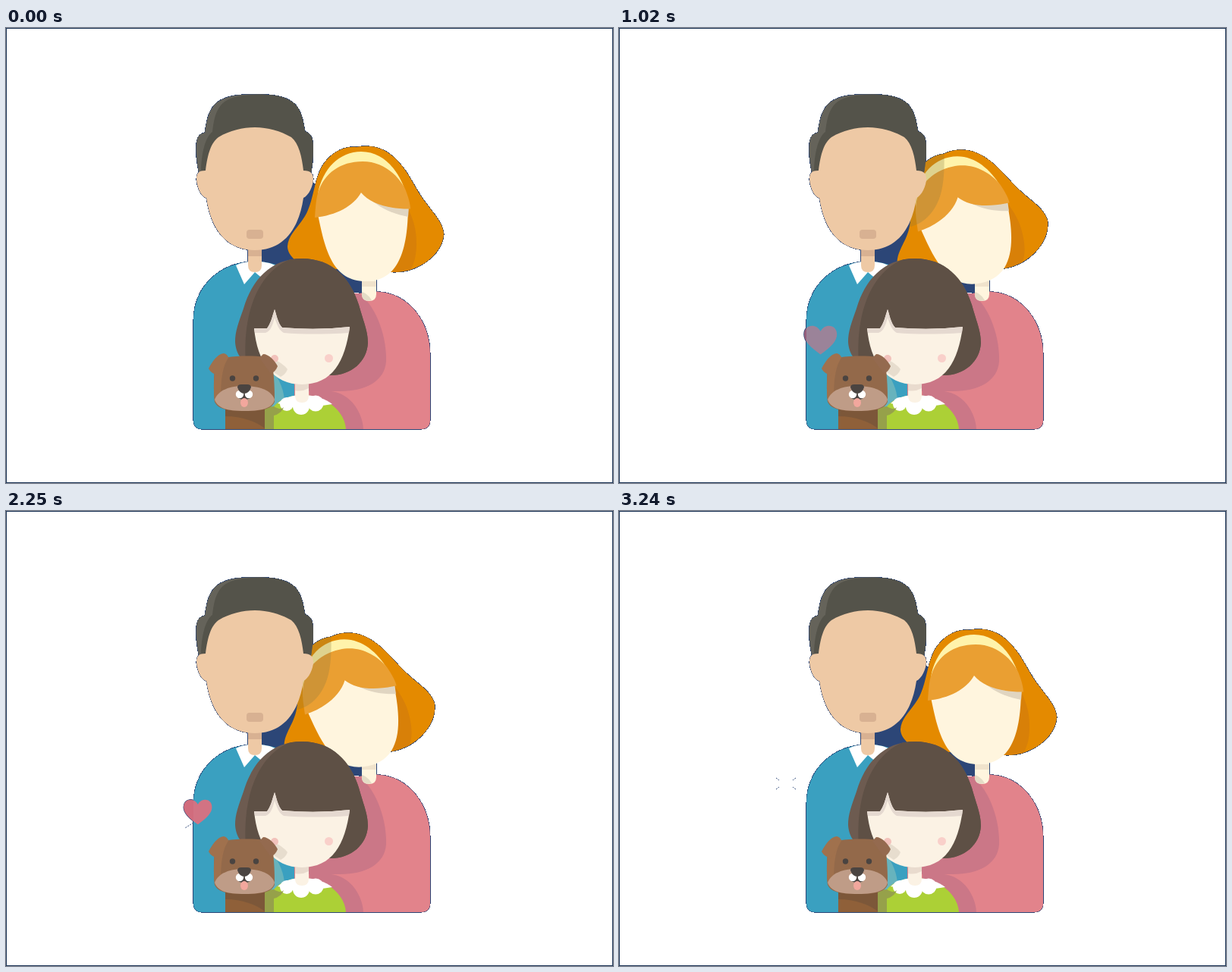
An HTML page for the animation above (3270 ms loop, 800 by 600 pixels).

```html
<!DOCTYPE html>
<html lang="en">
<head>
<meta charset="utf-8">
<title>Family</title>
<style>
html, body { margin: 0; width: 100%; height: 100%; overflow: hidden; background: #fff; }
svg { display: block; width: 800px; height: 600px; }
</style>
</head>
<body>
<svg viewBox="0 0 800 600">
<defs>
  <path id="dadHair" d="M254 190C251 175 250 160 251 152C252 142 256 139 262 138C264 125 266 108 278 98C292 88 310 87.500 328 87.500C346 87.500 365 88 378 98C390 107 392 125 394 136C400 139 404 142 404.500 152C405.500 165 404 180 402 191L392 188Z"/>
  <path id="dadFace" d="M263 188C253 188 251 192 251 200C252 212 258 223 264 224C270 265 290 293 328 293C366 293 386 265 392 224C399 221 405 208 405 199C405 192 402 188 392 188C390 170 386 152 376 144C362 136 345 131 328 131C312 131 295 135 280 144C270 152 266 165 263 188Z"/>
  <path id="dadBody" d="M259 529Q247 529 247 517V386C247 341 282 308 328 308C345 308 365 312 380 325V529Z"/>
  <path id="momBody" d="M380 529V370L466 350C476 348 485 347 493 348C530 351 559 386 559 430V517Q559 529 547 529Z"/>
  <path id="momHair" d="M462 157C443 155 425 167 415 185C406 204 405 224 398 240C390 260 372 270 371 288C371 300 385 312 400 316L512 322C544 322 575 299 577 272C576 256 562 243 553 230C538 211 532 190 512 171C498 158 482 153 462 157Z"/>
  <path id="heart" d="M0 19C-14 9-22 1-22-8C-22-22-5-23 0-12C5-23 22-22 22-8C22 1 14 9 0 19Z"/>
  <clipPath id="onHair"><use href="#momHair" class="tilt"/></clipPath>
  <clipPath id="inDadHair"><use href="#dadHair"/></clipPath>
  <clipPath id="inGirlHair"><use href="#girlHair"/></clipPath>
</defs>

<rect x=".5" y=".5" width="799" height="599" fill="#fff" stroke="#1c3557"/>

<!-- dark rim around the group -->
<g fill="#2c4677" stroke="#2c4677" stroke-width="1.2" shape-rendering="crispEdges">
  <use href="#dadHair"/><use href="#dadFace"/><use href="#dadBody"/><use href="#momBody"/>
  <use href="#momHair" class="tilt"/>
  <path d="M330 285L402 200L440 240L489 325V349H440L340 315Z" stroke="none"/>
  <path d="M319 285V310M488 325V349" fill="none"/>
</g>
<use id="heartBack" href="#heart" fill="#2c4677" stroke="#2c4677" stroke-width="1.5"/>
<g fill="none" stroke="#2c4677" stroke-dasharray="2 1.5">
  <path id="wideRays" d="M236 390L247 397M247 411L236 418"/>
  <path id="smallRays" d="M207 352L211 355M233 352L229 355M207 367L211 364M233 367L229 364"/>
</g>

<!-- mother -->
<use href="#momBody" fill="#e2838b"/>
<g fill="#cb7787">
  <path d="M440 349L466 350C490 370 502 410 501 440C499 465 475 479 440 479H390Z"/>
  <path d="M400 479H428C455 482 470 508 471 529H400Z"/>
</g>
<g class="tilt">
  <use href="#momHair" fill="#e48a00"/>
  <path d="M531 240C539 258 541 270 541 285C541 302 537 314 532 319.500L510 322L500 290Z" fill="#d88008"/>
</g>
<path d="M469 320H488V351Q488 360 478.500 360Q469 360 469 351Z" fill="#fff5de"/>
<path d="M469 334H488V341H469Z" fill="#f0e3cc"/>
<path d="M469 348C475 350 479 354 482 359Q469 362 469 351Z" fill="#e4dcc6"/>
<g class="tilt">
  <path d="M411 246C420 289 429 334 474 334C519 334 529 290 530 238L468 210Z" fill="#fff5de"/>
  <path d="M480 226L531 236L530 249C515 246 500 242 480 226Z" fill="#e0d5c1"/>
  <path d="M411 219C417 185 440 163 468 163C498 163 517 188 526 214L470 190Z" fill="#fff3ab"/>
  <path d="M407 250C408 235 409 222 412 215C420 192 440 176 470 176C496 176 515 192 526 212C530 222 533 232 533 238.500C505 239 480 232 468 217C458 235 435 247 407 250Z" fill="#ea9f32"/>
</g>
<path id="dadShade" clip-path="url(#onHair)" d="M380 150H428C430 195 428 222 413 242C405 253 395 260 380 263Z" fill="#857840"/>

<!-- father -->
<use href="#dadBody" fill="#3aa0c0"/>
<path d="M303 313C310 309 318 308 328 308C341 308 349 310 355 313L339 331L328 322L314 338Z" fill="#fff"/>
<path d="M319 285H337V313Q337 322 328 322Q319 322 319 313Z" fill="#eec9a5"/>
<path d="M319 288H337V301H319Z" fill="#d8b192"/>
<use href="#dadHair" fill="#65635a"/>
<path clip-path="url(#inDadHair)" d="M257 192C257 165 263 143 272 137C275 112 279 93 312 89L420 80V195Z" fill="#54534a"/>
<use href="#dadFace" fill="#eec9a5"/>
<rect x="317" y="266" width="22" height="12" rx="4" fill="#d8b192"/>

<use id="heartFront" href="#heart" fill="#e0707e"/>

<!-- girl -->
<path d="M341 455H354C364 470 368 485 367 500L353 510H341Z" fill="#67b3bd"/>
<path id="girlHair" d="M390 304C430 304 454 330 465 365C472 390 477 400 477 415C476 440 455 458 428 458L330 447C311 442 303 430 302 414C302 400 306 390 313 370C324 333 348 304 390 304Z" fill="#6d5b50"/>
<path clip-path="url(#inGirlHair)" d="M318 460C311 415 314 330 376 304H490V470Z" fill="#5e5045"/>
<path d="M327 396C331 440 352 470 390 470C430 470 447 440 453 394Q410 399 364 395C358 389 356 376 354 371C351 380 349 390 344 396Z" fill="#fbf2e4"/>
<path d="M327 396H344C349 390 351 380 354 371C356 376 358 389 364 395Q410 399 453 394L452 402C420 404 390 404 366 402C359 398 357 390 354 382C351 394 348 400 342 402H328Z" fill="#e5d9d0"/>
<path d="M355 438C362 441 368 446 371 450C369 455 366 458 362 460L350 452Z" fill="#e7ddce"/>
<circle cx="354" cy="436" r="5" fill="#f2c2bb"/>
<circle cx="425.500" cy="435.500" r="5.500" fill="#f9d0ca"/>
<path d="M353 529V499C362 488 378 484 392 484C425 485 447 508 448 529Z" fill="#acd036"/>
<g fill="#fff">
  <path d="M358 495C367 487 378 484 392 484C408 484 421 489 430 496L390 502Z"/>
  <circle cx="370" cy="496" r="9"/><circle cx="389" cy="499" r="11"/>
  <circle cx="408" cy="495" r="10.500"/>
</g>
<path d="M341 500L353 499C360 503 363 503 366 500C364 506 358 510 353 511V529H341Z" fill="#96a14a"/>
<path d="M381 468H399V485Q399 494 390 494Q381 494 381 485Z" fill="#fbf2e4"/>
<path d="M381 469Q390 471 399 469V475Q390 480 381 478Z" fill="#e9dbce"/>

<!-- dog -->
<path d="M289 498H341V529H289Z" fill="#7c5739"/>
<path d="M289 512C311 512 330 519 341 528V529H289Z" fill="#8f6039"/>
<g id="dogHead">
  <path d="M276 440C279 431 345 430 350 437C354 460 354 480 354 493C350 502 340 505 315 505C290 505 279 502 275 493C273 475 274 455 276 440Z" fill="#93694a"/>
  <path d="M275 493C273 475 274 455 277 441L293 434C284 450 282 470 284 500Z" fill="#a0714d"/>
  <path d="M267 449C272 440 278 430 287 429C291 430 293 433 293 435L279 459C275 456 270 455 267 449Z" fill="#a0714d"/>
  <path d="M358 446C354 438 346 430 339 430L334 435L349 456C353 454 356 451 358 446Z" fill="#946a4f"/>
  <path d="M275 490C280 477 296 472 313 472C335 472 350 478 354 490C352 500 340 505 315 505C290 505 279 501 275 490Z" fill="#bf9c87"/>
  <ellipse cx="314" cy="486" rx="9" ry="4" fill="#4a4441"/>
  <ellipse cx="314" cy="494" rx="5" ry="6" fill="#f2a79d"/>
  <circle cx="308" cy="483" r="5.200" fill="#fff"/><circle cx="320" cy="483" r="5.200" fill="#fff"/>
  <path d="M305 474Q305 470 310 470H318Q323 470 323 474Q320 482 314 482Q308 482 305 474Z" fill="#4a4441"/>
  <circle cx="298.500" cy="462" r="3.700" fill="#4a4441"/><circle cx="329.500" cy="462" r="3.700" fill="#4a4441"/>
</g>
</svg>
<script>
const LOOP = 3270, BEAT = 1110;
const get = id => document.getElementById(id);
const clamp = v => Math.min(1, Math.max(0, v));
const ramp = (t, from, to) => clamp((t - from) / (to - from));
const ease = u => u * u * (3 - 2 * u);
const set = (el, name, value) => el.setAttribute(name, value);
const tilted = document.querySelectorAll('.tilt');

function drawHeart(t) {
  // two hearts float up, one beat apart
  const h = t < 1890 ? t : t < 3000 ? t - BEAT : 0;
  const u = ease(ramp(h, 780, 1560));
  const alpha = Math.min(ramp(h, 810, 1170), 1 - ramp(h, 1430, 1630));
  const scale = 1 - 0.5 * clamp((u - 0.2) / 0.8);
  const place = `translate(${279 - 59 * u} ${427 - 67 * u}) scale(${scale})`;
  set(get('heartFront'), 'transform', place);
  set(get('heartBack'), 'transform', place);
  set(get('heartFront'), 'opacity', alpha);
  set(get('heartBack'), 'opacity', alpha > 0.03 ? 1 : 0);

  const since = t - 1080;
  const wide = since >= 0 && since % BEAT < 555;
  set(get('wideRays'), 'opacity', +wide);
  set(get('smallRays'), 'opacity', +(since >= 0 && !wide));
}

function draw(t) {
  const lean = ease(ramp(t, 0, 540)) - ease(ramp(t, 2720, 3240));
  tilted.forEach(el => set(el, 'transform', `rotate(${-12.4 * lean} 486 319)`));
  set(get('dadShade'), 'opacity', 0.27 * lean);
  const nod = 0.75 * (1 - Math.cos(t / LOOP * 6 * Math.PI));
  set(get('dogHead'), 'transform', `translate(0 ${nod})`);
  drawHeart(t);
}

const start = performance.now();
function tick() {
  draw((performance.now() - start) % LOOP);
  requestAnimationFrame(tick);
}
draw(0);
requestAnimationFrame(tick);
</script>
</body>
</html>
```
